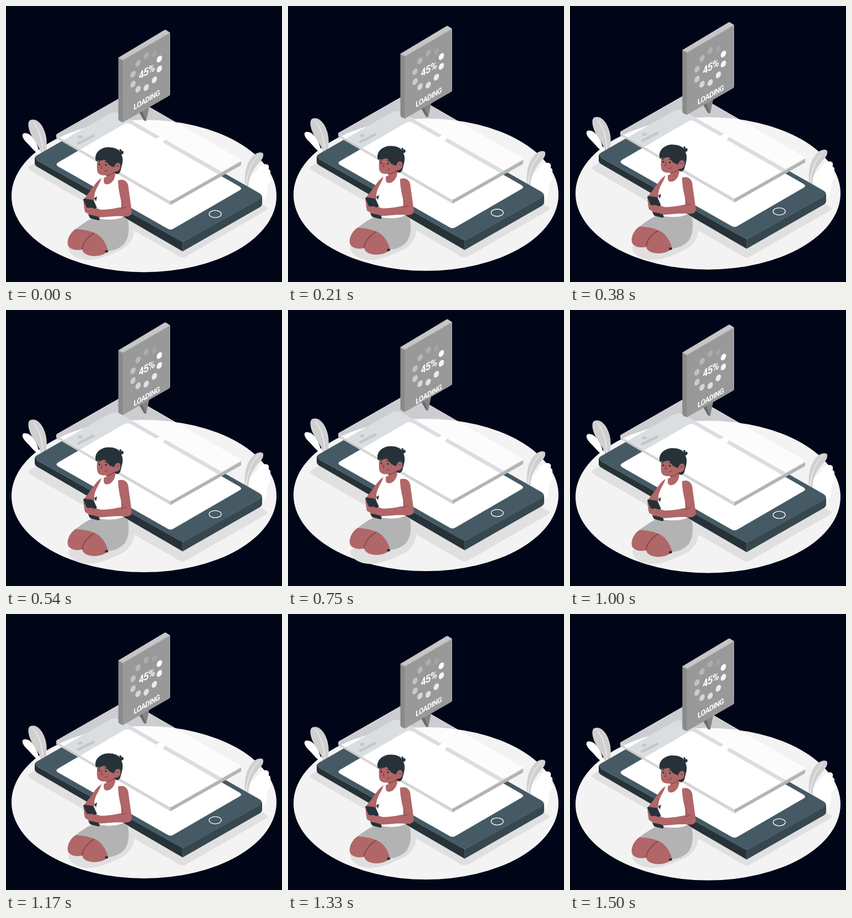
These frames come from a looping animation (500 by 500 pixels, 1.54 s). An HTML page:

```html
<!DOCTYPE html>
<html lang="en">
<head>
<meta charset="utf-8">
<title>Loading</title>
<style>
  html, body { margin: 0; width: 100%; height: 100%; overflow: hidden; background: #000518; }
  svg { display: block; width: 100%; height: 100%; }
  .skin { fill: #b16668; }
  .ink { fill: #263238; }
  .line { fill: none; stroke-linecap: round; }
  text { font: 700 14px Roboto, sans-serif; letter-spacing: -.58px; fill: #fff; text-anchor: middle; }
  .percent { font-size: 19px; font-weight: 600; letter-spacing: -.8px; }
</style>
</head>
<body>
<svg viewBox="0 0 500 500">
  <ellipse class="float" cx="250" cy="344.3" rx="240" ry="138" fill="#f3f3f3"/>

  <g fill="#e0e0e0">
    <path d="M44 289L190 206L470 363Q478 367 470 371L326 454Q320 457 314 454L44 298Q36 293 44 289Z"/>
    <path d="M113 436C112 450 130 460 150 460C175 459 190 449 208 442C226 433 235 415 231 400L190 390Z"/>
  </g>

  <g class="float">
    <g id="plants">
      <path fill="#fff" d="M60 269C49 262 45 254 37 247C30 240 27 232 33 230.500C45 229 57 245 61 269Z"/>
      <path fill="#d0d0d0" d="M64 267C59 252 50 244 44 230C39 217 39 206 47 206C57 204 67 216 71 230C75 243 74 256 72 266Z"/>
      <path class="line" stroke="#fff" d="M50 211C60 225 66 242 67 266"/>
      <path fill="#fff" d="M438 322C440 307 452 304 459 292C465 285 475 285 476 290C477 294 474 296 478 297C482 303 474 308 479 312C482 319 474 321 473 327C472 332 475 335 472 340C470 346 472 350 464 351Z"/>
      <path fill="#d0d0d0" d="M433 326C431 303 435 285 447 272C453 265 465 263 466 268C467 277 460 281 455 288C447 298 440 310 439 327Z"/>
      <path class="line" stroke="#fff" d="M459 269C446 281 437 300 435 325"/>
    </g>

    <g id="phone">
      <path class="ink" d="M52 274V284.500Q52 288.500 57 291.500L320 444.500V427L57 280Z"/>
      <path fill="#37474f" d="M320 444.500L459 365Q464 362 464 358V345L320 427Z"/>
      <path fill="#455a64" d="M57 270L188 195Q197 190 206 195L459 339Q468 345 459 350L325 425Q320 428 315 425L57 280Q48 275 57 270Z"/>
      <path class="line" stroke="#60737c" stroke-width=".6" d="M57 280L315 425Q320 428 325 425L459 350M320 427V443"/>
      <path fill="#fff" d="M95 283L212 215Q219 210 226 214L423 327Q429 331 423 334L304 403Q298 407 292 403L95 291Q88 287 95 283ZM279 236L289 241L283 248L271 241Z"/>
      <ellipse class="line" cx="379" cy="377" rx="11" ry="6.500" stroke="#fff" stroke-width="1.300"/>
    </g>

    <g id="glass" transform="translate(0 -.7)">
      <path fill="#fff" opacity=".8" d="M94 232L213 164Q219 160 225 164L424 279Q428 281 424 283L302 352Q298 355 294 352L94 237Q89 234 94 232Z"/>
      <path fill="#d2d2d2" opacity=".93" d="M91 234V240L294 359Q296 361 298 361V354Q296 354 294 352L94 237Z"/>
      <path fill="#b3b3b3" d="M298 354V361Q300 361 302 359L426 289V281L302 352Z"/>
      <path class="line" stroke="#fff" stroke-width=".8" d="M94 237L294 352Q298 355 302 352L424 283Q428 281 424 279L225 164Q219 160 213 164L94 232Q89 234 94 237"/>
      <ellipse cx="134.500" cy="238" rx="4.500" ry="2.800" fill="#c4c8ca"/>
      <path class="line" stroke="#c4c8ca" stroke-width="5" d="M131 249.500L158 236"/>
    </g>
  </g>

  <g id="sign">
    <path fill="#6b6b6b" d="M240 191L248 187L254 209L250 208Z"/>
    <path fill="#858585" d="M246 189L260 181L254 209Z"/>
    <path fill="#8a8a8a" d="M203.500 94L212 98V211.500L206 209Q203.500 207 203.500 205Z"/>
    <path fill="#c6c6c6" d="M203.500 94L287 44Q288.500 43 290 44L297 48.500L212 98Z"/>
    <path fill="#999" d="M211.500 98L297 48.500V161Q297 162 295 163.500L211.500 211.500Z"/>
    <path class="line" stroke="#ddd" stroke-width=".7" d="M204 94.500L211.500 98.300L296.700 49V161"/>
  </g>
  <g id="label">
    <g transform="matrix(.866 -.5 0 1 254 119)">
      <g id="dots" fill="#fff"></g>
      <text class="percent" x="1" y="7">45%</text>
      <text x="1" y="56.500">LOADING</text>
    </g>
  </g>

  <g id="woman" class="float">
    <path class="skin" d="M126 404C114 412 109 427 113 435C118 443 132 443 138 441C139 449 150 453 160 453C171 453 180 449 185 444L180 410L145 400Z"/>
    <path class="line" stroke="#7d4144" stroke-width="1.500" d="M160 411C148 419 139 429 138 440"/>
    <path class="ink" d="M179 443L185 442V446L180 447Z"/>
    <path fill="#b3b3b3" d="M161 384C180 388 200 388 213 381L221 389C224 405 222 421 214 431C206 439 196 443 185 444C182 431 175 420 166 414C154 407 140 405 126 404C137 396 150 386 161 384Z"/>
    <path class="skin" d="M177 311C165 313 160 327 141 350C139 359 143 371 151 377L161 372L159 352C166 342 174 330 177 311Z"/>
    <path class="skin" d="M180 304L198 294V311L208 318L190 331L175 320V311L182 310Z"/>
    <path fill="#fff" d="M178 310L173 312C169 325 159 334 160 349C161 358 166 363 166 370L163 384C180 388 201 388 212 382C206 367 213 345 206 316L198 306C196 320 184 327 178 321Q176 316 178 310Z"/>
    <path class="skin" d="M203 316C214 312 222 319 222 330L228 373C228 380 222 382 212 381C193 380 181 383 167 383C158 381 150 378 149 369C155 364 163 366 171 369C183 369 196 367 211 364C208 350 203 333 203 316Z"/>
    <path class="line" stroke="#7d4144" d="M211 364L209 354M209 367L218 364"/>
    <path class="ink" d="M160 348L165 345L163 354ZM140 351Q140 349 143 349L156 351Q158 351 159 353L164 364Q165 367 162 367L150 369Q148 369 147 367ZM149 377L168 382L170 386Q169 389 166 388L154 385Q151 384 149 377Z"/>
    <path class="skin" d="M149 366C155 364 161 367 163 371L160 379L151 378L143 373L141 363Z"/>

    <path class="ink" d="M163 281C158 266 173 255 187 256C196 256 203 259 207 264L205 260Q210 258 209 263Q213 261 213 266Q212 269 209 269C214 279 210 288 207 300C204 306 199 305 197 302L180 280Z"/>
    <path class="skin" d="M165 280C165 287 164 295 166 301C168 307 180 309 190 304L198 300C205 300 209 294 207 287C205 282 198 283 196 292C187 290 182 284 178 278C174 280 170 281 165 280Z"/>
    <path class="line" stroke="#7d4144" stroke-width="1.200" d="M174 288L172 294L175 294M179 299Q182 300 184 297M183 307Q191 306 196 301M200 290Q203 288 204 291"/>
    <path class="line" stroke="#263238" stroke-width="1.300" d="M167 283L170 281M179 282L184 284"/>
    <circle class="ink" cx="169" cy="287" r="1.600"/>
    <circle class="ink" cx="181" cy="288" r="1.700"/>
  </g>
</svg>
<script>
  const LOOP = 1540, HALF = LOOP / 2, FPS = 24, FRAMES = 37, TOP_TIME = 720;
  const floating = document.querySelectorAll('.float');
  const sign = document.getElementById('sign');
  const label = document.getElementById('label');
  const shift = (el, y) => el.setAttribute('transform', `translate(0 ${y.toFixed(2)})`);

  // Ring of dots fading clockwise from the brightest one
  document.getElementById('dots').innerHTML = Array.from({ length: 10 }, (_, i) => {
    const a = (i * 36 - 18) * Math.PI / 180;
    return `<circle cx="${29 * Math.cos(a)}" cy="${29 * Math.sin(a)}" r="5.500" opacity="${1 - i * 0.1}"/>`;
  }).join('');

  function draw(now) {
    const frame = Math.floor((now % LOOP + 4) * FPS / 1000) % FRAMES;
    const t = frame * 1000 / FPS;
    const u = Math.abs((t - TOP_TIME + LOOP + HALF) % LOOP - HALF) / HALF;
    const lift = u + 0.045 * Math.sin(Math.PI * u * u);
    shift(sign, 29 * lift - 28);
    shift(label, 19 * lift - 18.3);
    floating.forEach(el => shift(el, 10 * lift - 9.6));
  }

  const start = performance.now();
  function tick() {
    draw(performance.now() - start);
    requestAnimationFrame(tick);
  }
  tick();
</script>
</body>
</html>
```
